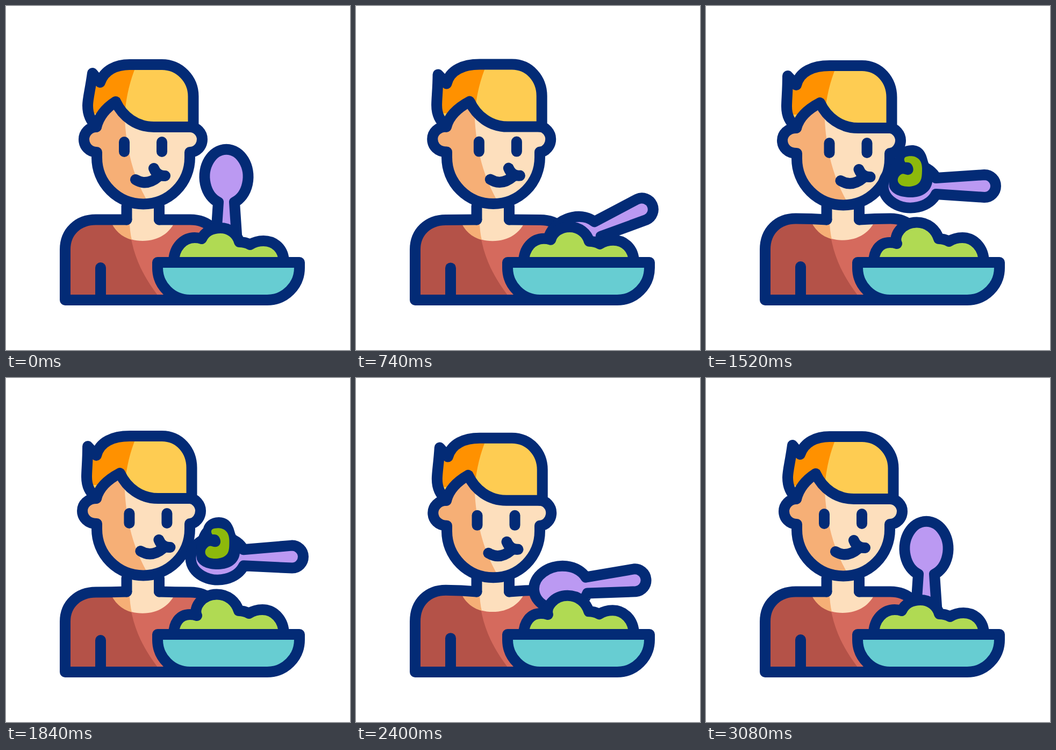
Recreate the animation shown at these times as an HTML page. Size 640 px wide and 640 px high, loop 3100 ms.

```html
<!DOCTYPE html>
<html lang="en">
<head>
<meta charset="utf-8">
<title>Meal time</title>
<style>
  html, body { margin: 0; width: 100%; height: 100%; overflow: hidden; background: #fff; }
  svg { display: block; width: 100%; height: 100%; }
  .ink { stroke: #032b76; stroke-width: 20; stroke-linecap: round; stroke-linejoin: round; }
  .line { fill: none; }
</style>
</head>
<body>
<svg viewBox="0 0 640 640">
  <defs>
    <clipPath id="bodyClip"><path data-d="body"/></clipPath>
    <clipPath id="faceClip"><path data-d="face"/></clipPath>
    <clipPath id="hairClip"><path data-d="hair"/></clipPath>
  </defs>

  <g clip-path="url(#bodyClip)">
    <path fill="#d56a5d" d="M100 370H410V560H100Z"/>
    <path fill="#b45248" d="M100 370H229V400C232 460 255 505 290 548H100Z"/>
    <g id="collar">
      <path fill="#fddfbd" d="M190 385C198 418 220 437 254 437S312 418 320 385Z"/>
      <path fill="#f6af76" d="M190 385C196 413 212 429 234 435Q230 420 229 385Z"/>
    </g>
  </g>
  <path fill="#fddfbd" d="M231 355H280V410H231Z"/>
  <path class="ink line" data-d="shoulders"/>
  <path class="ink line" data-d="arm"/>
  <path class="ink line" d="M224.5 372V397.5M285 372V397.5"/>

  <g id="head">
    <g clip-path="url(#faceClip)">
      <path fill="#fddfbd" d="M130 160H380V380H130Z"/>
      <path fill="#f6af76" d="M130 160H220C219 240 228 305 267 370H130Z"/>
    </g>
    <path class="ink line" data-d="jaw"/>
    <g clip-path="url(#hairClip)">
      <path fill="#fecc52" d="M130 90H370V240H130Z"/>
      <path fill="#ff9100" d="M130 90H252Q226 140 221 200H130Z"/>
    </g>
    <path class="ink line" data-d="hair"/>
    <g id="features">
      <path class="ink line" data-d="eyes"/>
      <path class="ink line" d="M241 323Q262 336 284 317M275 302Q281 317 296 316"/>
    </g>
  </g>

  <g id="spoon">
    <path class="ink" fill="#bb99f2" d="M47 -15A51 40.5 0 1 0 47 15L137 21A21 21 0 0 0 137 -21Z"/>
    <g id="bite">
      <path fill="#032b76" d="M341 337C346 350 362 356 381 356C402 356 418 346 421 328L428 307C418 302 414 294 412 286C408 268 398 259 383 259C367 259 357 268 354 279C344 290 338 310 341 337Z"/>
      <path fill="#8db90c" d="M371 281C382 277 402 279 402 302C402 318 401 326 394 331C386 337 372 337 364 334C356 330 355 322 359 317C362 313 366 311 370 313C380 317 388 310 385 300C383 293 378 290 371 291C368 288 368 283 371 281Z"/>
    </g>
  </g>

  <path class="ink" fill="#b0da53" data-d="food"/>
  <path class="ink" fill="#67cdd2" d="M282 477H546V487A60 60 0 0 1 486 547H342A60 60 0 0 1 282 487Z"/>
</svg>

<script>
const LOOP = 3100, NOD = 870;

const clamp = v => Math.min(1, Math.max(0, v));
const ease = (t, from, to) => {
  const u = clamp((t - from) / (to - from));
  return u * u * (3 - 2 * u);
};

// Stops of the spoon: time, position of its bowl, tilt of its handle
const stops = [
  { at: 0, x: 410, y: 318, tilt: 90 },
  { at: 440, x: 431, y: 348, tilt: -29.6 },
  { at: 620, x: 438, y: 385, tilt: -27 },
  { at: 860, x: 376, y: 482, tilt: -21 },
  { at: 1520, x: 381, y: 335, tilt: 0 },
  { at: 1840, x: 395, y: 335, tilt: -1 },
  { at: 2180, x: 373, y: 333, tilt: 1 },
  { at: 2660, x: 394, y: 463, tilt: -14.5 },
  { at: 3080, x: 410, y: 318, tilt: 90 }
];

function spoonAt(t) {
  const next = Math.max(1, stops.findIndex(s => s.at > t));
  if (t >= stops.at(-1).at) return stops.at(-1);
  const a = stops[next - 1], b = stops[next];
  const k = ease(t, a.at, b.at);
  const mix = key => a[key] + (b[key] - a[key]) * k;
  return { x: mix("x"), y: mix("y"), tilt: mix("tilt") };
}

// The nod swings above its rest height only in the middle of the loop
function nodAt(t) {
  if (t > 3 * NOD) return 0;
  const over = t > NOD / 2 && t < 2.5 * NOD ? 2 : 0;
  return (6 + over) * (1 - Math.cos(2 * Math.PI * t / NOD)) / 2 - over;
}

function turnAt(t) {
  const away = t < 1500 ? 1 - t / 1500 : (t - 1500) / 1120;
  return clamp(1 - away ** 4);
}

function shouldersPath(lift, gap) {
  const top = 397.5 - lift, side = 420 - lift;
  return `M110 547V453C110 ${side} 134 ${top} 167 ${top}Q196 ${top} 224.5 397.5
    ${gap}285 397.5Q314 ${top} 343 ${top}C376 ${top} 400 ${side} 400 453V547H110V540`;
}

function jawPath(k) {
  const l = 145 - 3 * k, r = 365 - 3 * k;
  return `M168 225C${l + 10} 225 ${l} 236 ${l} 248C${l} 261 ${l + 10} 272 169 272
    V282A86.5 86.5 0 0 0 342 282V272
    C${r - 10} 272 ${r} 261 ${r} 248C${r} 236 ${r - 10} 225 342 225`;
}

function hairPath(k) {
  const left = 152 - 2 * k, right = 348.5 - 3 * k, part = 8 * k;
  return `M168 225C${left + 6} 213 ${left} 203 ${left} 185
    C${left} 172 ${157 - 5 * k} 155 ${161 - 9 * k} ${125 + 3 * k}
    L${175 - 7 * k} ${142 + 3 * k}C${183 - 9 * k} 119 ${205 - 5 * k} 109 230 109
    H290C323 109 ${right} 136 ${right} 168V225H${275 + part}
    C${243 + part} 225 ${217 + part} 206 ${204 + part} 178
    C${187 + part / 2} 189 173 205 168 225Z`;
}

function foodPath(k) {
  const small = 431 + 9 * k, big = 413 - 10.5 * k, last = 437 - 6 * k;
  const x = 351 - 9 * k, end = 479 - 2 * k;
  return `M312 477C312 ${small + 17} ${x - 20} ${small} ${x} ${small}
    Q${x + 7} ${small} ${x + 13} ${small + 2}
    C${370 - 22 * k} ${420 + 8 * k} ${383 - 19 * k} ${big} ${399 - 7 * k} ${big}
    C${416 - 2 * k} ${big} ${430 - 2 * k} ${424 - 7 * k} ${434 - k} ${last + 2}
    Q${end - 34} ${last + 2} ${end - 25} ${last + 7}
    C${end - 17} ${last + 2} ${end - 9} ${last} ${end} ${last}
    C${end + 21} ${last} 517 ${452 - 3 * k} 517 477Z`;
}

const byId = id => document.getElementById(id);
const move = (id, value) => byId(id).setAttribute("transform", value);
const shape = (name, d) =>
  document.querySelectorAll(`[data-d=${name}]`).forEach(el => el.setAttribute("d", d));

function draw(t) {
  const nod = nodAt(t), turn = turnAt(t);
  const blink = ease(t, 2070, 2160) - ease(t, 2200, 2290);
  const heap = ease(t, 640, 1000) - .7 * ease(t, 2250, 2660) - .3 * ease(t, 2660, 3000);
  const bite = ease(t, 840, 1000) - ease(t, 2220, 2400);
  const spoon = spoonAt(t);

  shape("body", shouldersPath(nod, "L"));
  shape("shoulders", shouldersPath(nod, "M"));
  shape("arm", `M176 ${487 - nod}V547`);
  move("collar", `translate(0 ${-nod * .67})`);

  move("head", `translate(0 ${nod})`);
  shape("jaw", jawPath(turn));
  shape("face", `${jawPath(turn)}H${275 + 8 * turn}L${204 + 8 * turn} 178Z`);
  shape("hair", hairPath(turn));
  move("features", `translate(${turn * 9.5} 0)`);
  const half = 9 * (1 - blink) + .01, mid = 262 + 2 * blink;
  const eye = x => `M${x} ${mid - half}V${mid + half}`;
  shape("eyes", eye(220) + eye(290));

  move("spoon", `translate(${spoon.x} ${spoon.y}) rotate(${spoon.tilt})`);
  move("bite", `translate(0 15) scale(${bite}) translate(-381 -350)`);
  byId("bite").style.display = bite > .01 ? "" : "none";
  shape("food", foodPath(heap));
}

const start = performance.now();
function tick() {
  draw((performance.now() - start) % LOOP);
  requestAnimationFrame(tick);
}
tick();
</script>
</body>
</html>
```
